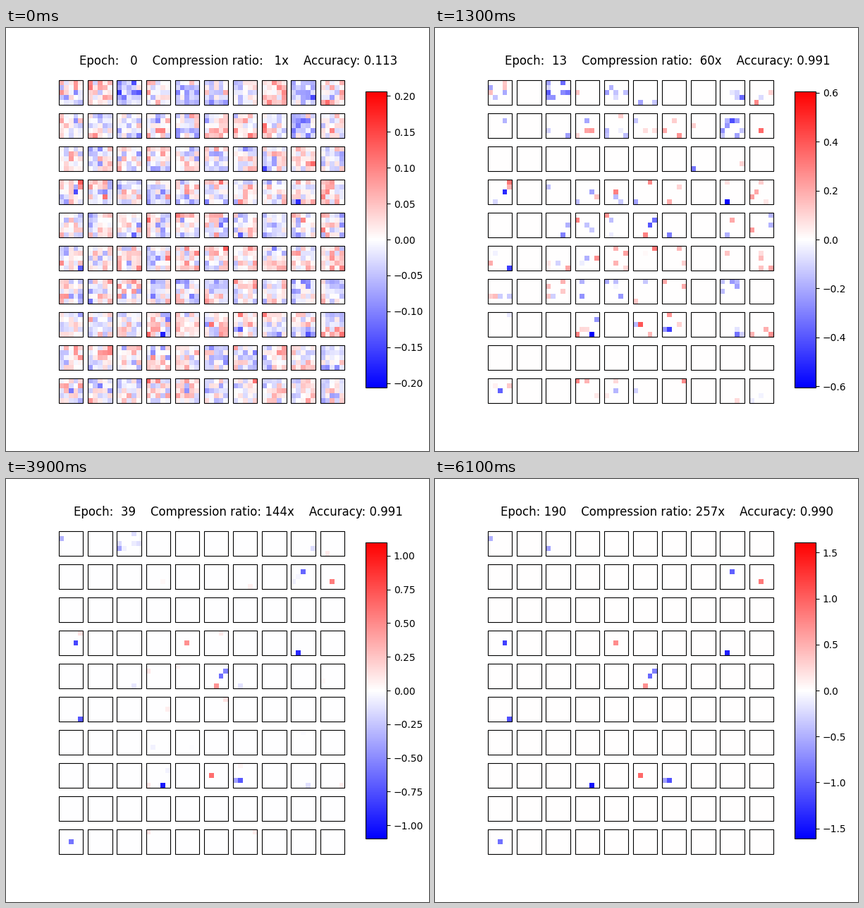
A matplotlib script for the animation above (6.2 s loop, 600 by 600 pixels).

```python
import numpy as np
import matplotlib.pyplot as plt
from matplotlib.animation import FuncAnimation
from matplotlib.patches import Rectangle

SIZE, FRAMES, INTERVAL = 600, 62, 100
GRID, KERNEL = 10, 5

# Panel layout in pixels, measured from the top left.
BOX = 405 / 11.8
ROW_HEIGHT = 462 / 11.8
X0, X_STEP = 75, BOX * 1.2
Y0, Y_STEP = 72 + (ROW_HEIGHT - BOX) / 2, ROW_HEIGHT * 1.2

KEYS = [0, 7, 13, 24, 32, 47, 61]
LIMITS = [0.2062, 0.4455, 0.605, 0.859, 0.908, 1.317, 1.611]
RATIOS = [1, 15, 60, 115, 131, 159, 257]
ACC_KEYS = [0, 1, 3, 7, 24, 32, 47]
ACCURACY = [0.113, 0.978, 0.988, 0.991, 0.991, 0.992, 0.990]

# Kernels with a strong tone: positive is red, negative is blue.
TONES = {1: .035, 2: -.06, 4: -.045, 7: .035, 8: -.065, 18: -.045}

# The strongest weights, which outlast the rest: kernel, cell, last value.
STRONG = [
    (0, 5, -.5), (2, 15, -.6), (18, 7, -1), (19, 17, .85),
    (30, 13, -1.2), (34, 12, .72), (38, 21, -1.4), (45, 9, -.8),
    (45, 13, -.95), (45, 22, .7), (50, 24, -1.1), (73, 23, -1.5),
    (75, 11, .95), (76, 15, -.6), (76, 16, -1.1), (90, 12, -.9),
]


def start_weights():
    """Random kernels, each with its own tone and a slight slope."""
    rng = np.random.default_rng(12)
    n = GRID * GRID
    tone = rng.normal(0, 0.012, n)
    tone[list(TONES)] = list(TONES.values())
    slope = rng.normal(0, 0.008, (2, n, 1, 1))
    ramp = np.arange(KERNEL) - 2
    w = rng.normal(0, 0.038, (n, KERNEL, KERNEL)) + tone[:, None, None]
    w += slope[0] * ramp[:, None] + slope[1] * ramp
    return np.clip(w, -0.16, 0.16).reshape(n, -1)


def lifetimes(w):
    """The weaker a weight, the sooner it is pruned; some panels thin early."""
    row, col = np.divmod(np.arange(GRID * GRID), GRID)
    thin = np.isin(row, (2, 8)) | np.isin(col, (1, 7))
    score = np.abs(w) * np.where(thin, 0.65, 1)[:, None]
    rank = np.argsort(np.argsort(-score, axis=None)) / score.size
    life = np.interp(rank, [0, .02, .035, .066, .3, 1], [50, 32, 24, 13, 7, 1])
    return life.reshape(w.shape)


def history():
    t = np.arange(FRAMES)
    w = start_weights()
    left = np.maximum(1 - t[:, None, None] / lifetimes(w), 0)
    gain = np.interp(t, [0, 7, 13], [1, 2, 3])[:, None, None]
    h = w * gain * left ** 0.7
    growth = np.interp(t, [0, 7, 13, 32, 61], [.12, .25, .42, .55, 1])
    for kernel, cell, value in STRONG:
        h[:, kernel, cell] = value * growth
    h = h.reshape(FRAMES, GRID, GRID, KERNEL, KERNEL)
    return h.transpose(0, 1, 3, 2, 4).reshape(FRAMES, GRID * KERNEL, -1)


def pixel_cells(start, step):
    """Cell under each pixel along one direction, and whether there is one."""
    p = np.arange(SIZE) + 0.5 - start
    panel = np.floor(p / step).astype(int)
    offset = p - panel * step
    inside = (panel >= 0) & (panel < GRID) & (offset < BOX)
    cell = panel * KERNEL + (offset / BOX * KERNEL).astype(int)
    return np.where(inside, cell, 0), inside


def epoch(i):
    """Steps of 1, then of 5 from 40 on, then of 10 from 100 on."""
    return i + 4 * max(i - 40, 0) + 5 * max(i - 52, 0)


def ratio(i):
    if i < 13:
        return round(np.exp(np.interp(i, KEYS, np.log(RATIOS))))
    return round(np.interp(i, KEYS, RATIOS))


weights = history()
col, in_x = pixel_cells(X0, X_STEP)
row, in_y = pixel_cells(Y0, Y_STEP)
inside = in_y[:, None] & in_x
cells = np.ix_(row, col)

plt.rcParams["font.family"] = "DejaVu Sans"
fig = plt.figure(figsize=(6, 6), dpi=100, facecolor="white")
ax = fig.add_axes([0, 0, 1, 1])
ax.axis("off")
image = ax.imshow(np.zeros((SIZE, SIZE)), cmap="bwr", interpolation="nearest",
                  extent=(0, SIZE, SIZE, 0), aspect="auto",
                  vmin=-LIMITS[0], vmax=LIMITS[0])
for r in range(GRID):
    for c in range(GRID):
        ax.add_patch(Rectangle((X0 + c * X_STEP, Y0 + r * Y_STEP), BOX, BOX,
                               fill=False, ec="black", lw=0.8, snap=True))
fig.colorbar(image, cax=fig.add_axes([0.85, 0.15, 0.05, 0.7]))
title = fig.text(0.549, 548 / SIZE, "", size=12, ha="center", va="baseline")


def update(i):
    limit = np.interp(i, KEYS, LIMITS)
    image.set_data(np.where(inside, weights[i][cells], np.nan))
    image.set_clim(-limit, limit)
    accuracy = np.interp(i, ACC_KEYS, ACCURACY)
    title.set_text(f"Epoch: {epoch(i):3d}    Compression ratio: {ratio(i):3d}x"
                   f"    Accuracy: {accuracy:.3f}")
    return image, title


anim = FuncAnimation(fig, update, frames=FRAMES, interval=INTERVAL,
                     repeat=True, repeat_delay=0, blit=False)
plt.show()
```
